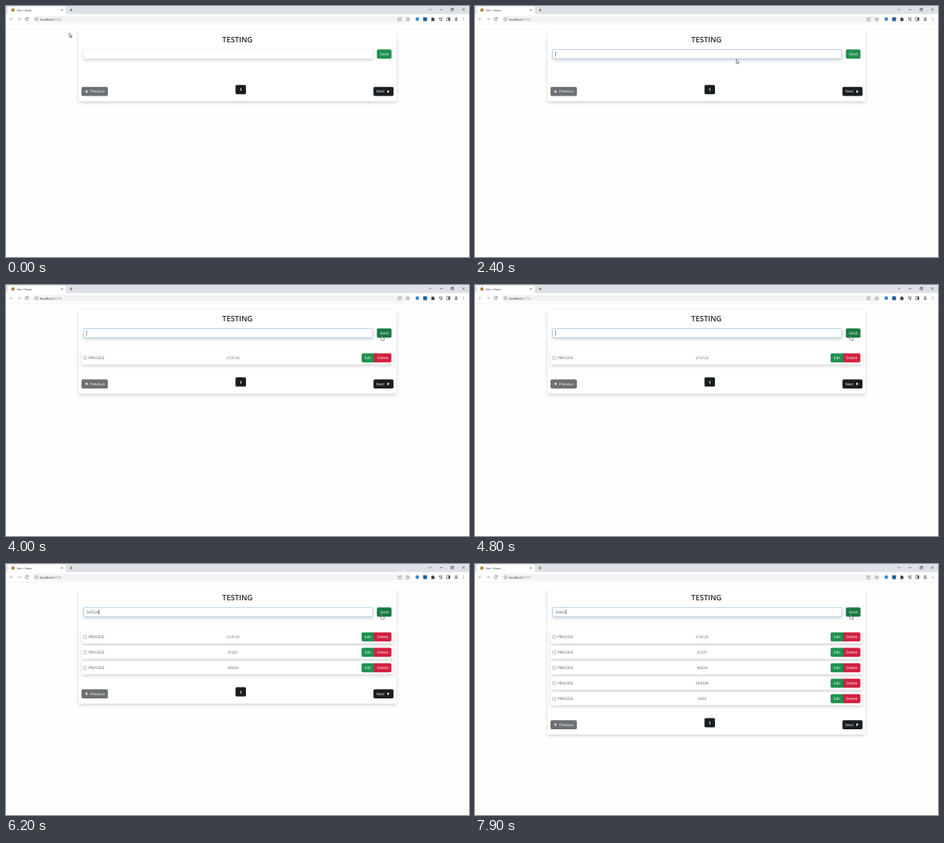
An HTML page that plays this animation: 600x325 px, repeating every 8 s.

```html
<!DOCTYPE html>
<html lang="en">
<head>
<meta charset="utf-8">
<title>Vite + React</title>
<style>
  html, body { margin: 0; width: 100%; height: 100%; overflow: hidden; background: #fefefd; }
  svg { display: block; width: 600px; height: 325px; }
  text { font: 4.75px "Open Sans", "Noto Sans", sans-serif; fill: #212529; text-rendering: geometricPrecision; white-space: pre; }
  .mid { text-anchor: middle; }
  .light { fill: #fff; }
  .title { font-size: 9.7px; font-weight: 600; }
  .row text { fill: #4b4f53; }
  .shadow { filter: drop-shadow(0 2px 2.3px rgba(0, 0, 0, .17)); }
  .line { fill: none; stroke: #5f6368; stroke-width: .6; }
  .dark { stroke: #3c4043; }
  .green { fill: #1e9150; }
  .green.hover { fill: #177a42; }
  .red { fill: #d2203f; }
  .black { fill: #1b1e21; }
  .grey { fill: #6d7072; }
  #field { fill: #fff; stroke: #e3e5e8; stroke-width: .35; }
  #field.focus { stroke: #86b7e6; stroke-width: .6; }
  #typed { fill: #4b4f53; }
</style>
</head>
<body>
<svg viewBox="0 0 600 325">
  <rect width="600" height="325" fill="#fefefd"/>

  <!-- browser chrome -->
  <rect width="600" height="11" fill="#dee1e6"/>
  <path d="M0 11Q2 11 2 9V3Q2 .8 4 .8H75.5Q77.5 .8 77.5 3V9Q77.5 11 79.5 11Z" fill="#fff"/>
  <rect y="10.5" width="600" height="13" fill="#fff"/>
  <rect y="23.3" width="600" height=".4" fill="#e3e5e8"/>
  <circle cx="9" cy="5.2" r="2.2" fill="#a98a3c"/>
  <text x="14" y="6.7" style="font-size:3.6px">Vite + React</text>
  <path class="line dark" d="M71.4 4.1l2.2 2.2m0-2.2l-2.2 2.2M82.6 5.1h3.8m-1.9-1.9v3.8"/>
  <path class="line dark" d="M548 3.7l1.6 1.6 1.6-1.6M562 4.7h3.6M576.7 3.7h2.5v2.5h-2.5zM577.5 3.7v-.8h2.5v2.5h-.8M591.2 3l3.2 3.2m0-3.2l-3.2 3.2"/>
  <path class="line" stroke-opacity=".55" d="M9.2 17H5m2-2l-2 2 2 2M14.8 17H19m-2-2l2 2-2 2"/>
  <path class="line dark" d="M28.6 15.8a2 2 0 1 0 .3 1.8M28.9 14.7v1.5h-1.6"/>
  <rect x="34.5" y="12.8" width="491" height="8.6" rx="4.3" fill="#f1f3f4"/>
  <circle class="line" cx="39.5" cy="17" r="1.9" style="stroke-width:.45"/>
  <path class="line" d="M39.5 16.8v1.2M39.5 15.8v.5" style="stroke-width:.45"/>
  <text x="44" y="18.5" style="font-size:4.1px">localhost<tspan fill="#74787d">:5173</tspan></text>
  <path class="line" style="stroke-width:.5" d="M510 15.5h-1.8v3.6h3.8v-1.3M509.5 17.5q.3-1.9 2.6-1.9m-.9-1l1.1 1-1.1 1"/>
  <path class="line" style="stroke-width:.5" d="M520.6 14.8l.7 1.5 1.6.2-1.2 1.1.3 1.6-1.4-.8-1.4.8.3-1.6-1.2-1.1 1.6-.2z"/>
  <circle cx="533" cy="17" r="2.4" fill="#3f8bd2"/>
  <rect x="540.6" y="14.6" width="5" height="5" fill="#1d5c9c"/>
  <path d="M551 15.6h1.1a.9.9 0 0 1 1.8 0h1.1v1.2a.9.9 0 0 1 0 1.7v1.1h-4v-1.2a.8.8 0 0 0 0-1.6z" fill="#3c4043"/>
  <path class="line dark" d="M561 15.2h3.2M561 16.6h2.4M561 18h1.4M564.8 18.2v-3h1"/>
  <circle cx="564.1" cy="18.4" r=".9" fill="#3c4043"/>
  <path class="line dark" d="M571 15h4.2v4H571z"/>
  <path d="M573.4 15h1.8v4h-1.8z" fill="#3c4043"/>
  <circle cx="583.4" cy="17" r="2.9" fill="#e4e6e8"/>
  <circle cx="583.4" cy="15.8" r="1" fill="#62696f"/>
  <path d="M581.2 18.7q2.2-2.7 4.4 0z" fill="#62696f"/>
  <g fill="#5f6368"><circle cx="593" cy="15.3" r=".5"/><circle cx="593" cy="17" r=".5"/><circle cx="593" cy="18.7" r=".5"/></g>

  <!-- page -->
  <rect id="card" class="shadow" x="94" y="31.3" width="412" height="92" rx="1" fill="#fff"/>
  <text class="title mid" x="300" y="46.8">TESTING</text>
  <g class="shadow"><rect id="field" x="100.6" y="56.4" width="374.8" height="11.8" rx="1.5"/></g>
  <text id="typed" x="104.2" y="63.8"></text>
  <rect id="caret" y="59" width=".5" height="6.6" fill="#222"/>
  <rect id="send" class="green" x="480.6" y="56.2" width="19" height="12" rx="1.8"/>
  <text class="mid light" x="490.1" y="63.8">Send</text>
  <g id="rows"></g>
  <g id="footer">
    <rect class="grey" x="97.8" y="104.8" width="34.2" height="11.8" rx="1.8"/>
    <path class="light" d="M102.6 110.7l2.7-2v4z"/>
    <text class="light" x="109" y="112.4">Previous</text>
    <rect class="black" x="297.4" y="102.2" width="13.6" height="12" rx="1.6"/>
    <text class="mid light" x="304.2" y="110.2" style="font-weight:700;font-size:5px">1</text>
    <rect class="black" x="476.2" y="104.8" width="26" height="11.8" rx="1.8"/>
    <text class="light" x="480" y="112.4">Next</text>
    <path class="light" d="M497 110.7l-2.7-2v4z"/>
  </g>

  <g id="cursor" stroke-linejoin="round">
    <path id="arrow" d="M0 0V5.3L1.3 4.2 2.2 6.2 3.1 5.8 2.2 3.8H3.9Z" fill="#fff" stroke="#222" stroke-width=".5"/>
    <path id="beam" d="M-1-2.6H1M0-2.6V2.6M-1 2.6H1" fill="none" stroke="#222" stroke-width=".5"/>
    <path id="hand" d="M-.6 .3Q0-.4 .6 .3V2.3L3 2.9Q3.6 3.1 3.5 3.8L3 6.3H.1L-1.7 3.9Q-1.7 3-.6 3.6Z" fill="#fff" stroke="#222" stroke-width=".5"/>
  </g>
</svg>
<script>
  const LOOP = 8000, TICK = 100, FOCUS = 2100;
  const DIGIT = 4.75 * .572;
  const $ = id => document.getElementById(id);

  // text, first key, ms per key, time the field clears
  const entries = [
    ['213123', 2650, 50, 3800],
    ['31321', 4200, 100, 4800],
    ['43324', 5100, 75, 5500],
    ['543534', 5800, 80, 6400],
    ['2423', 6700, 66, 7200],
    ['54363', 7500, 100, LOOP]
  ].map(([text, start, step, clear]) => ({ text, start, step, clear, saved: clear + 100 }));

  const path = [
    [0, 82, 35], [100, 49, 17], [600, 541, 180], [800, 541, 180], [1700, 300, 74],
    [1900, 290, 63], [2200, 290, 63], [2400, 338.5, 69], [2600, 486.8, 65.5]
  ];

  const saved = entries.filter(e => e.saved < LOOP);
  $('rows').innerHTML = saved.map((e, i) => `
    <g class="row" transform="translate(0 ${i * 20})">
      <rect class="shadow" x="98" y="86" width="404" height="16.8" rx="1" fill="#fff"/>
      <rect x="100.7" y="92.6" width="3.7" height="3.7" rx=".7" fill="#fff" stroke="#777" stroke-width=".5"/>
      <text x="107" y="96.3">PROCESS</text>
      <text class="mid" x="294.2" y="96.3">${e.text}</text>
      <path class="green" d="M477 88.5h-14.4q-1.8 0-1.8 1.8v8.2q0 1.8 1.8 1.8H477z"/>
      <path class="red" d="M477 88.5h20.6q1.8 0 1.8 1.8v8.2q0 1.8-1.8 1.8H477z"/>
      <text class="mid light" style="fill:#fff" x="469" y="96.2">Edit</text>
      <text class="mid light" style="fill:#fff" x="488.2" y="96.2">Delete</text>
    </g>`).join('');
  const rows = [...$('rows').children];

  const show = (el, on) => { el.style.display = on ? '' : 'none'; };
  const within = (x, y, l, t, r, b) => x >= l && x <= r && y >= t && y <= b;

  function pointer(t) {
    const i = path.findIndex(p => p[0] > t);
    if (i < 0) return path[path.length - 1].slice(1);
    const [t0, x0, y0] = path[i - 1], [t1, x1, y1] = path[i];
    const k = (t - t0) / (t1 - t0), e = k * k * (3 - 2 * k);
    return [x0 + (x1 - x0) * e, y0 + (y1 - y0) * e];
  }

  function field(t) {
    let text = '', last = FOCUS;
    for (const e of entries) {
      if (t < e.start) break;
      if (t >= e.clear) { text = ''; last = e.clear; continue; }
      const n = Math.min(e.text.length, Math.floor((t - e.start) / e.step) + 1);
      text = e.text.slice(0, n);
      last = e.start + (n - 1) * e.step;
    }
    return { text, caret: t >= FOCUS && (t - last) % 1000 < 500 };
  }

  function draw(t) {
    const { text, caret } = field(t);
    $('typed').textContent = text;
    $('field').classList.toggle('focus', t >= FOCUS);
    show($('caret'), caret);
    $('caret').setAttribute('x', 104.2 + text.length * DIGIT);

    const count = saved.filter(e => t >= e.saved).length;
    const grow = count ? 17.4 + (count - 1) * 20 : 0;
    rows.forEach((row, i) => show(row, i < count));
    $('card').setAttribute('height', 92 + grow);
    $('footer').setAttribute('transform', `translate(0 ${grow})`);

    const [x, y] = pointer(t);
    const hand = within(x, y, 480.6, 56, 499.6, 68.3);
    const beam = within(x, y, 100, 56, 476, 68.3) || within(x, y, 42, 13, 505, 21.4);
    $('cursor').setAttribute('transform', `translate(${x} ${y})`);
    show($('hand'), hand);
    show($('beam'), beam);
    show($('arrow'), !hand && !beam);
    $('send').classList.toggle('hover', hand);
  }

  const begin = performance.now();
  function loop() {
    const t = (performance.now() - begin) % LOOP;
    draw(Math.floor(t / TICK) * TICK);
    requestAnimationFrame(loop);
  }
  draw(0);
  requestAnimationFrame(loop);
</script>
</body>
</html>
```
